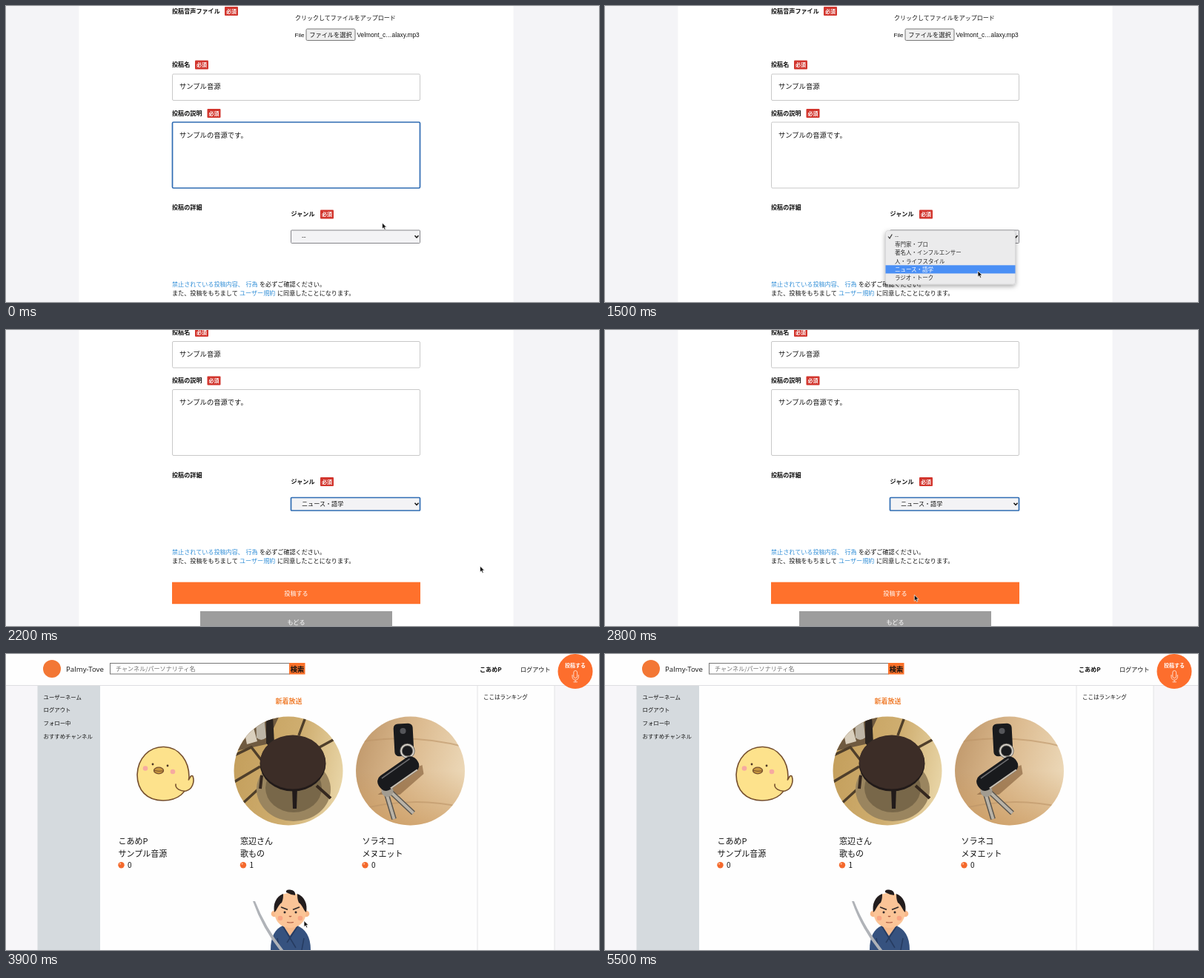
An HTML page that plays this animation: 800 by 400 pixels, repeating every 5.6 s.

```html
<!DOCTYPE html>
<html lang="ja">
<head>
<meta charset="utf-8">
<title>投稿フォーム</title>
<style>
html, body { margin: 0; width: 100%; height: 100%; overflow: hidden; background: #fff; }
svg { display: block; width: 800px; height: 400px; }
text { font-family: "Noto Sans CJK JP", "Noto Sans CJK", sans-serif; white-space: pre; }
.latin { font-family: "Liberation Sans", Arial, sans-serif; }
.brand { font-family: "Noto Sans", sans-serif; }
</style>
</head>
<body>
<svg id="stage" viewBox="0 0 800 400">
  <defs>
    <clipPath id="disc"><circle r="73.5"/></clipPath>
    <linearGradient id="tatami" x1="0" y1=".4" x2="1" y2=".6">
      <stop offset="0" stop-color="#c49f5c"/><stop offset=".55" stop-color="#cfae70"/><stop offset="1" stop-color="#e9d6a8"/>
    </linearGradient>
    <linearGradient id="wood" x1="0" y1=".2" x2="1" y2=".5">
      <stop offset="0" stop-color="#bf976a"/><stop offset=".5" stop-color="#dcbb90"/><stop offset="1" stop-color="#ecd8b8"/>
    </linearGradient>
    <linearGradient id="grain" x1="0" y1="0" x2="0" y2="1">
      <stop offset=".5" stop-color="#c58f50" stop-opacity="0"/><stop offset="1" stop-color="#c58f50" stop-opacity=".6"/>
    </linearGradient>
    <filter id="drop" x="-10%" y="-10%" width="120%" height="130%">
      <feDropShadow dx="0" dy="2.5" stdDeviation="3" flood-opacity=".35"/>
    </filter>
  </defs>

  <g id="form">
    <rect width="800" height="400" fill="#f4f4f7"/>
    <rect x="98.5" width="586" height="400" fill="#fff"/>
    <g id="sheet"></g>
    <g id="menu"></g>
  </g>

  <g id="home">
    <rect width="800" height="400" fill="#f7f6f9"/>
    <rect x="42.5" y="42" width="84.5" height="358" fill="#d5dade"/>
    <rect x="127" y="42" width="613" height="358" fill="#fefefe"/>
    <path d="M636 42V400M740 42V400" stroke="#e3e3e6"/>
    <rect width="800" height="42" fill="#fefefe"/>
    <path d="M0 42.5H800" stroke="#dedee1"/>
    <circle cx="62" cy="20" r="12" fill="#f37735"/>
    <rect x="140.5" y="12.5" width="242" height="14.5" fill="#fff" stroke="#777"/>
    <rect x="382" y="12" width="21.5" height="15.5" fill="#fb7029"/>
    <circle cx="768" cy="23.5" r="23.5" fill="#fd6e2d"/>
    <g fill="none" stroke="#ffe3d4" stroke-width=".9">
      <rect x="765.8" y="22.5" width="4.8" height="10" rx="2.4"/>
      <path d="M764 28v3a4.2 4.2 0 0 0 8.4 0v-3M768.2 35.3v2.5M765.5 37.8h5.4"/>
    </g>

    <g id="chick" stroke="#76502f" stroke-width="1.6" stroke-linecap="round" stroke-linejoin="round">
      <path fill="#fde28c" d="M213 125.5C235 126 247 146 247 166C246 188 231 198 212 198C190 198 177 184 177 163C178 141 193 125 213 125.5Z"/>
      <path fill="#fde28c" d="M229 176C228 182 236 186 243 185C251 183 255 173 252 165C250 163 248 167 246.5 170"/>
      <g fill="#f6aaa0" stroke="none"><circle cx="188" cy="154.5" r="3.3"/><circle cx="225" cy="159" r="3.3"/></g>
      <g fill="#4c3526" stroke="none"><circle cx="198" cy="149" r="1.4"/><circle cx="218" cy="151" r="1.4"/></g>
      <ellipse cx="206" cy="157.5" rx="6.5" ry="4.3" fill="#c9983f" stroke-width="1.3"/>
      <path d="M200 157.5q6 1.5 12 .5" fill="none" stroke-width="1"/>
    </g>

    <g transform="translate(381 158)"><g clip-path="url(#disc)">
      <rect x="-75" y="-75" width="150" height="150" fill="url(#tatami)"/>
      <path d="M-75 -75H-12L-30 -36L-75 -26Z" fill="#6f5a40"/>
      <path d="M-60 -56L-48 -62L-42 -40L-56 -36Z" fill="#d9cfbd"/>
      <path d="M-44 -75h11l3 30q-7 6 -13 0Z" fill="#bdb5a6"/>
      <path d="M-30 -75h9l2 38q-6 5 -11 0Z" fill="#2b2420"/>
      <path d="M-75 -20L-50 -32L-36 -14M-75 16L-38 -6M-64 46L-40 24M24 -75L14 -48M42 -32L75 -50" stroke="#4f3f2b" stroke-width="3.5" fill="none"/>
      <ellipse cx="7" cy="25" rx="50" ry="43" fill="#9a855f"/>
      <ellipse cx="7" cy="23" rx="38" ry="33" fill="#786749"/>
      <path d="M-36 6L-38 24M38 20L57 37" stroke="#35281f" stroke-width="4"/>
      <path d="M5 22h7l-1 29h-5Z" fill="#211a1a"/>
      <ellipse cx="6" cy="-10" rx="44.5" ry="37.5" fill="#211a19"/>
      <ellipse cx="6" cy="-12" rx="44" ry="36.5" fill="#3c2d27"/>
    </g></g>

    <g transform="translate(545.5 158)"><g clip-path="url(#disc)">
      <rect x="-75" y="-75" width="150" height="150" fill="url(#wood)"/>
      <rect x="-75" y="-75" width="150" height="150" fill="url(#grain)"/>
      <path d="M-75 -38Q0 -52 75 -32M-75 54Q0 32 75 50" stroke="#bd9568" stroke-width="2" fill="none" opacity=".6"/>
      <path d="M-44 32L2 -2L16 -8L18 4L-14 32Z" fill="#8d6843" opacity=".7"/>
      <path d="M-34 25L-22 65M-29 26L4 57" fill="none" stroke="#5d5850" stroke-width="7"/>
      <path d="M-34 25L-22 65M-29 26L4 57" fill="none" stroke="#b9b3a8" stroke-width="4"/>
      <circle cx="-31" cy="27" r="8" fill="#a29c91"/>
      <rect x="-22" y="-64" width="26" height="44" rx="6" fill="#191a1d" transform="rotate(-3 -9 -42)"/>
      <circle cx="-10" cy="-54" r="4" fill="#55565a"/>
      <circle cx="-4" cy="-27" r="8.5" fill="none" stroke="#77736d" stroke-width="3.5"/>
      <circle cx="-4" cy="-27" r="8.5" fill="none" stroke="#e1ddd5" stroke-width="1.5"/>
      <g transform="rotate(-35 -16 4)">
        <rect x="-47" y="-8" width="62" height="23" rx="10" fill="#191a1d"/>
        <path d="M-38 -4H8" stroke="#6d6d70" stroke-width="1.5"/>
        <path d="M-36 14H8" stroke="#c9c0b2" stroke-width="2"/>
      </g>
    </g></g>

    <g id="samurai">
      <path d="M357 400C357 382 363 371 374 367H392C404 371 411 382 411 400Z" fill="#36527f"/>
      <path d="M374 367L383 381L393 367Z" fill="#f4b98b"/>
      <path d="M373 367L391 397M394 367L379 390M366 384L369 400M402 384L399 400" stroke="#263b60" stroke-width="1.5" fill="none"/>
      <circle cx="362" cy="351" r="4.3" fill="#f8b98a"/><circle cx="405" cy="351" r="4.3" fill="#f8b98a"/>
      <path d="M383 323C398 323 405 333 405 347C405 361 396 370 383 370C371 370 362 361 362 347C362 333 369 323 383 323Z" fill="#fbc497"/>
      <path d="M374 324C364 328 360 338 362 349C366 346 367 339 372 336C374 332 374 327 374 324ZM393 324C403 328 407 338 405 349C401 346 400 339 395 336C393 332 393 327 393 324Z" fill="#231d1e"/>
      <path d="M378 322Q377 318 383 318.500Q391 319 390 326Q383 325 378 322Z" fill="#231d1e"/>
      <path d="M371 342L380 345.500M396 342L387 345.500" stroke="#30292a" stroke-width="1.8"/>
      <circle cx="376" cy="349" r="1.5" fill="#30292a"/><circle cx="391" cy="349" r="1.5" fill="#30292a"/>
      <circle cx="370" cy="357" r="3.3" fill="#f8a583"/><circle cx="397" cy="357" r="3.3" fill="#f8a583"/>
      <path d="M382 354q1.500 1.500 3 0M379 362.500q4.500 1 9 0" stroke="#a85840" stroke-width="1.2" fill="none"/>
      <path d="M333 334Q346 371 370 401H375Q350 370 336 334Z" fill="#b0b3b8"/>
    </g>
  </g>

  <path id="cursor" d="M0 0V8.3L1.9 6.5L3.2 9.4L4.7 8.7L3.4 5.9H6Z" fill="#111" stroke="#fff" stroke-width=".7"/>
</svg>
<script>
const LOOP = 5600, STEP = 100, SCROLL = 76.5;
const INK = '#111', BLUE = '#3490d8';
const $ = id => document.getElementById(id);

function add(parent, tag, attrs, content) {
  const el = document.createElementNS('http://www.w3.org/2000/svg', tag);
  for (const k in attrs) el.setAttribute(k, attrs[k]);
  if (content !== undefined) el.textContent = content;
  parent.append(el);
  return el;
}

// Text placed by its vertical middle
const label = (parent, x, mid, size, str, opts = {}) =>
  add(parent, 'text', { x, y: mid + size * 0.38, 'font-size': size, fill: INK, ...opts }, str);

const box = (parent, x, y, width, height, opts) =>
  add(parent, 'rect', { x, y, width, height, ...opts });

const bold = { 'font-weight': 700 };
const medium = { 'font-weight': 500 };
const centred = { 'text-anchor': 'middle', fill: '#fff' };

// Form
const sheet = $('sheet');
const heading = (x, y, str, badgeX) => {
  label(sheet, x, y, 8.1, str, bold);
  if (!badgeX) return;
  box(sheet, badgeX, y - 5.5, 18, 12, { fill: '#d2352d', rx: 1 });
  label(sheet, badgeX + 9, y + .4, 7, '必須', { ...centred, ...bold });
};
heading(224, 6.5, '投稿音声ファイル', 295);
heading(224, 79, '投稿名', 255);
heading(224, 144.5, '投稿の説明', 271.5);
heading(224, 272, '投稿の詳細');
heading(384.5, 281, 'ジャンル', 424);

label(sheet, 390, 15.5, 8, 'クリックしてファイルをアップロード');
label(sheet, 389.5, 38.5, 8.1, 'File', { class: 'latin' });
box(sheet, 405, 31, 66, 15.5, { fill: '#efefef', stroke: '#777', rx: 1.5 });
label(sheet, 409.3, 38.5, 8.2, 'ファイルを選択');
label(sheet, 473.5, 38.5, 8.3, 'Velmont_c…alaxy.mp3', { class: 'latin' });

const field = { fill: '#fff', stroke: '#c8c8c8', rx: 1.5 };
box(sheet, 224.5, 92, 334, 35.5, field);
label(sheet, 234, 108.5, 9.3, 'サンプル音源');
const area = box(sheet, 224.5, 157, 334, 89, field);
label(sheet, 234, 174, 9.3, 'サンプルの音源です。');

const select = box(sheet, 384.5, 303, 174, 17.5, { fill: '#f3f3f5', rx: 1 });
const choice = label(sheet, 399, 311.7, 8.1, '--');
add(sheet, 'path', { d: 'M551.5 310.3L554 313L556.5 310.3', fill: 'none', stroke: INK, 'stroke-width': 1.5 });

label(sheet, 224, 376, 8.1, '禁止されている投稿内容、', { fill: BLUE });
label(sheet, 323.5, 376, 8.1, '行為', { fill: BLUE });
label(sheet, 342, 376, 8.1, 'を必ずご確認ください。');
label(sheet, 224, 388.3, 8.1, 'また、投稿をもちまして');
label(sheet, 315, 388.3, 8.1, 'ユーザー規約', { fill: BLUE });
label(sheet, 366, 388.3, 8.1, 'に同意したことになります。');

box(sheet, 224, 417.2, 335, 29.5, { fill: '#ff712c' });
label(sheet, 391.5, 432, 8.1, '投稿する', centred);
box(sheet, 262, 456.5, 259, 29.5, { fill: '#9d9d9d' });
label(sheet, 391.5, 471, 8.1, 'もどる', centred);

// Popup menu
const menu = $('menu'), ROW = 11.15, TOP = 305.7;
box(menu, 378.5, 303.5, 175, 72.5, { fill: '#ebebec', stroke: '#c9c9cb', 'stroke-width': .5, rx: 3, filter: 'url(#drop)' });
const bar = box(menu, 378.5, TOP, 175, ROW, { fill: '#4a8ff5' });
const items = ['--', '専門家・プロ', '著名人・インフルエンサー', '人・ライフスタイル', 'ニュース・語学', 'ラジオ・トーク']
  .map((s, i) => label(menu, 391, TOP + ROW * (i + .5), 7.5, s));
const check = add(menu, 'path', { d: 'M382 311.5L384 314L387.3 308.5', fill: 'none', 'stroke-width': 1.1 });

// Home page
const home = $('home');
label(home, 81, 20, 9.6, 'Palmy-Tove', { class: 'brand', fill: '#222', ...medium });
label(home, 148, 20, 8.1, 'チャンネル/パーソナリティ名', { fill: '#707070' });
label(home, 393, 20, 9.3, '検索', { ...bold, 'text-anchor': 'middle' });
label(home, 639, 21, 8.1, 'こあめP', bold);
label(home, 694, 21, 8.1, 'ログアウト');
label(home, 768, 15, 7, '投稿する', { ...centred, ...bold });
['ユーザーネーム', 'ログアウト', 'フォロー中', 'おすすめチャンネル'].forEach((s, i) =>
  label(home, 50.5, 58 + i * 17.65, 7.4, s, medium));
label(home, 644, 58, 7.5, 'ここはランキング', medium);
label(home, 381.5, 63.5, 9, '新着放送', { ...bold, fill: '#f08033', 'text-anchor': 'middle' });
[['こあめP', 'サンプル音源', 0], ['窓辺さん', '歌もの', 1], ['ソラネコ', 'メヌエット', 0]].forEach(([who, title, likes], i) => {
  const x = 151.5 + i * 164.5;
  label(home, x, 253, 11, who);
  label(home, x, 270.3, 11, title);
  add(home, 'circle', { cx: x + 4, cy: 285.3, r: 4.2, fill: '#f4692c' });
  add(home, 'circle', { cx: x + 2.6, cy: 283.6, r: 1.1, fill: '#ffc3a0' });
  label(home, x + 12.5, 285.3, 10, likes);
});

// Pointer path: time, x, y
const path = [
  [0, 507.5, 293], [400, 503, 309], [700, 503, 311], [1300, 503, 358], [1800, 503, 358],
  [2200, 639.5, 319], [2400, 549, 336], [2900, 402, 360.5], [4200, 402, 360.5],
  [4800, 309, 296], [4900, 309, 296], [5300, 304, 412], [LOOP, 304, 412]
];
const clamp = v => Math.max(0, Math.min(1, v));
const ease = v => v * v * (3 - 2 * v);

function pointer(t) {
  const i = path.findIndex(p => p[0] > t);
  const [t0, x0, y0] = path[i - 1], [t1, x1, y1] = path[i];
  const k = ease((t - t0) / (t1 - t0));
  return [x0 + (x1 - x0) * k, y0 + (y1 - y0) * k];
}

function focus(el, on, idle) {
  el.setAttribute('stroke', on ? '#2f6cb3' : idle);
  el.setAttribute('stroke-width', on ? 1.7 : 1);
}

function draw(now) {
  const t = Math.floor(now % LOOP / STEP) * STEP;
  const [x, y] = pointer(t);
  const posted = t >= 3600, picked = t >= 1900, open = t >= 500 && !picked;

  $('form').style.display = posted ? 'none' : '';
  home.style.display = posted ? '' : 'none';
  $('cursor').setAttribute('transform', `translate(${x} ${y})`);

  sheet.setAttribute('transform', `translate(0 ${-SCROLL * ease(clamp((t - 1900) / 300))})`);
  focus(area, t < 500, '#c8c8c8');
  focus(select, picked && t < 3400, '#85858a');
  choice.textContent = picked ? items[4].textContent : '--';

  menu.style.display = open ? '' : 'none';
  const row = Math.max(0, Math.min(5, Math.floor((y - TOP) / ROW)));
  bar.setAttribute('y', TOP + row * ROW);
  items.forEach((el, i) => el.setAttribute('fill', i === row ? '#fff' : '#2c2c2c'));
  check.setAttribute('stroke', row ? '#2c2c2c' : '#fff');
}

const start = performance.now();
function loop() {
  draw(performance.now() - start);
  requestAnimationFrame(loop);
}
loop();
</script>
</body>
</html>
```
